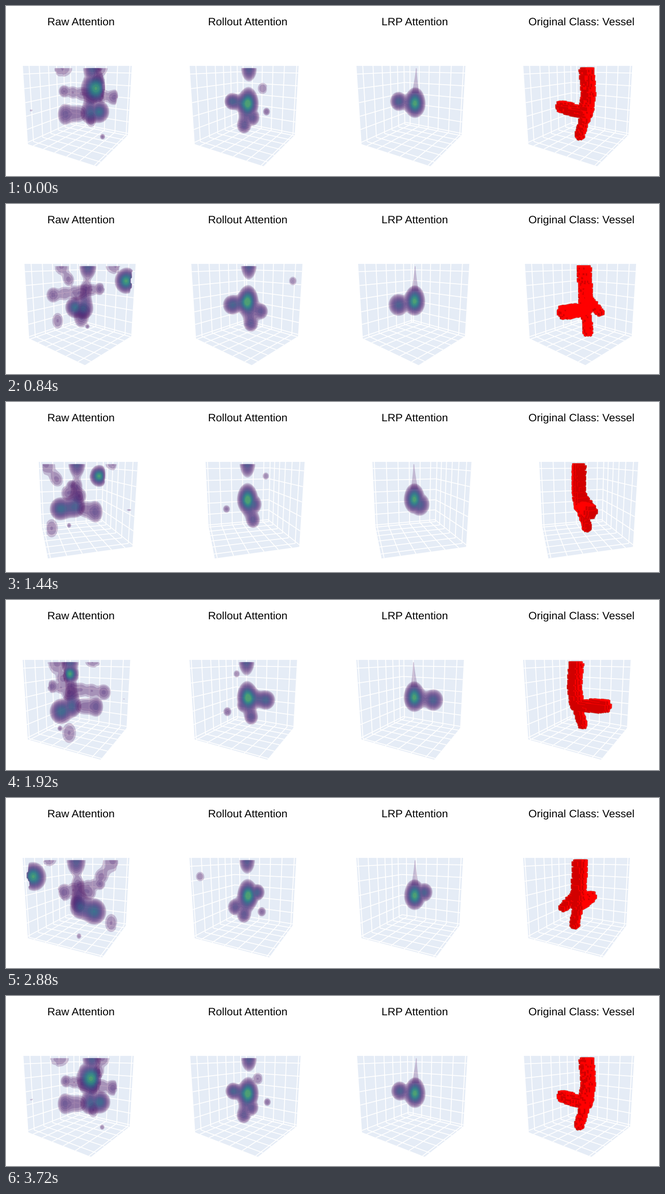
A matplotlib script for the animation above (3.84 s loop, 1280 by 335 pixels).

```python
import numpy as np
import matplotlib.pyplot as plt
from matplotlib.animation import FuncAnimation
from matplotlib.collections import LineCollection, PolyCollection

plt.rcParams["text.hinting"] = "no_hinting"

W, H, DPI = 1280, 335, 100
FRAMES, INTERVAL, STEP = 32, 120, 0.2      # STEP: radians of orbit per frame
CENTERS = (147, 474, 801, 1128)
TITLES = ("Raw Attention", "Rollout Attention", "LRP Attention",
          "Original Class: Vessel")

# Orbiting perspective camera, looking at the middle of a unit cube
PSI0, RADIUS, EYE_Z = np.arctan2(2, -1.25), np.hypot(1.25, 2), 0.5
TILT = np.arctan2(EYE_Z, RADIUS)
SIN_T, COS_T = np.sin(TILT), np.cos(TILT)
FOCAL, HORIZON = 356, 118
CY = HORIZON + FOCAL * np.tan(TILT)
INSET = 13.5 / 28.5
TICKS = (np.arange(0, 26, 5) - 13.5) / 28.5

# Low values get more surfaces, so blobs darken soon inside their rim
LEVELS = .08 + .82 * np.linspace(0, 1, 13) ** 1.35
LAYER_ALPHA = .22


def blob(point, peak, radius=None, stretch=1.15):
    """A Gaussian whose outermost surface has the given radius."""
    radius = radius or .06 + .085 * peak
    sigma = radius / np.sqrt(2 * np.log(peak / LEVELS[0]))
    return np.array(point), peak, sigma, sigma * stretch


def strand(start, end, peak, count=2):
    """Blobs spread evenly between two points."""
    a, b = np.array(start), np.array(end)
    return [blob(a + (b - a) * i / (count + 1), peak)
            for i in range(1, count + 1)]


# Key points: toward the viewer, right, up, as seen in the first pose
CORE, CROWN = (0, .005, 0), (.01, .015, INSET)
BRANCH, FORK, FOOT = (-.163, -.228, .007), (.17, .053, -.133), (.05, -.05, -.28)
NODE, CORNER = (-.146, .265, -.14), (.58, .145, .28)
STEM_TOP, STEM = (.07, .14, INSET), (.03, .115, -.12)
LOBE, SHEET, FLOOR = (.04, -.22, -.13), (.45, -.22, INSET), (-.38, .16, -.33)
RIGHT, LEFT, BACK = (.22, .40, .13), (-.30, -.25, .13), (-.34, .28, INSET)

RAW_FAINT = [
    blob(LOBE, .27, .085, 1.6), blob(RIGHT, .24), blob(LEFT, .22),
    blob(SHEET, .17, .13, .7), blob(BACK, .17, .11), blob(FLOOR, .16, .08, 1.5),
    blob((.05, .29, -.44), .2, .035), blob((.14, -.63, -.05), .13, .03, .4),
    *strand(LOBE, STEM, .13), *strand(LEFT, RIGHT, .15, 4),
    *strand(BACK, STEM, .17),
]
RAW_CORE = [
    blob(CORNER, .95, .15), blob(STEM_TOP, .5, .115, 1.6),
    blob(NODE, .56, .135), blob(STEM, .42, .12),
    *strand(STEM, NODE, .14), *strand(STEM, STEM_TOP, .2, 3)[:2],
]
SPINE = [blob(CORE, .92, stretch=1.35), *strand(CORE, CROWN, .2, 3)[:1]]
ROLLOUT = SPINE + [
    blob(BRANCH, .5), blob(FORK, .4), blob(FOOT, .4), blob(NODE, .22, .05),
    blob(CROWN, .5, .1, 1.7), blob(CORNER, .16, .05),
    *strand(CORE, BRANCH, .28), *strand(CORE, FOOT, .18, 1),
]
LRP = SPINE + [blob(BRANCH, .54, .118), *strand(CORE, BRANCH, .18, 1)]

# Each vessel is a path of key points and its thickness
VESSELS = [
    ([(.02, .065, INSET), (.04, .09, .15), (.05, .06, -.1)], .082),
    ([(.05, .06, -.1), (.09, -.02, -.4)], .055),
    ([(.03, .03, -.11), (-.16, -.28, -.07)], .076),
    ([(.06, .06, .06), (.24, .048, -.14)], .05),
]

# Ray samples in view coordinates stay the same for every pose
PX = np.arange(-117, 118, 2.5)
PY = np.arange(122.5, 290, 2.5)
ray_t = np.linspace(1.6, 3.25, 40)[:, None, None]
ray_x = PX[None, None, :] / FOCAL
ray_y = (CY - PY)[None, :, None] / FOCAL
RAY_U = (RADIUS - ray_t * (COS_T + ray_y * SIN_T)).astype(np.float32)
RAY_V = (ray_t * ray_x).astype(np.float32)
RAY_Z = (EYE_Z + ray_t * (ray_y * COS_T - SIN_T)).astype(np.float32)


def to_world(point):
    u, v, z = point
    c, s = np.cos(PSI0), np.sin(PSI0)
    return np.array([u * c - v * s, u * s + v * c, z])


def project(points, psi, cx):
    x, y, z = np.moveaxis(np.asarray(points, float), -1, 0)
    u = x * np.cos(psi) + y * np.sin(psi)
    v = y * np.cos(psi) - x * np.sin(psi)
    depth = (RADIUS - u) * COS_T - (z - EYE_Z) * SIN_T
    up = (RADIUS - u) * SIN_T + (z - EYE_Z) * COS_T
    return np.stack([cx + FOCAL * v / depth, CY - FOCAL * up / depth], -1)


def on_plane(axis, value, a, b):
    point = [a, b]
    point.insert(axis, value)
    return point


def square(axis, value, half):
    return [on_plane(axis, value, a * half, b * half)
            for a, b in ((-1, -1), (1, -1), (1, 1), (-1, 1))]


def build_vessel(n=40):
    """Boundary faces of the voxelised vessels: corners, centres, normals."""
    half = INSET / n
    cells = np.moveaxis(np.indices((n, n, n)), 0, -1) * 2 * half - INSET + half
    ripple = .006 * np.cos(2 * np.pi * 14 * cells[..., 2])
    solid = np.zeros((n, n, n), bool)
    for path, radius in VESSELS:
        knots = [to_world(p) for p in path]
        for a, b in zip(knots, knots[1:]):
            t = np.clip((cells - a) @ (b - a) / ((b - a) @ (b - a)), 0, 1)
            dist = np.linalg.norm(cells - a - t[..., None] * (b - a), axis=-1)
            solid |= dist < radius + ripple
    padded = np.pad(solid, 1)
    quads, normals = [], []
    for axis in range(3):
        for sign in (-1, 1):
            beside = np.roll(padded, -sign, axis)[1:-1, 1:-1, 1:-1]
            centers = cells[solid & ~beside]
            face = np.array(square(axis, sign * half, half))
            quads.append(centers[:, None] + face)
            normals.append(np.tile(np.eye(3)[axis] * sign, (len(centers), 1)))
    quads = np.concatenate(quads)
    return quads, quads.mean(1), np.concatenate(normals)


QUADS, MIDS, NORMALS = build_vessel()
MOTTLE = (np.random.default_rng(4).random(len(QUADS)) - .5) * .16

fig = plt.figure(figsize=(W / DPI, H / DPI), dpi=DPI, facecolor="white")
ax = fig.add_axes([0, 0, 1, 1])


def draw_box(psi):
    walls = [-np.copysign(.5, np.cos(psi)), -np.copysign(.5, np.sin(psi)), -.5]
    planes, lines = [], []
    for axis, value in enumerate(walls):
        planes.append(square(axis, value, .5))
        for tick in TICKS:
            lines.append([on_plane(axis, value, tick, e) for e in (-.5, .5)])
            lines.append([on_plane(axis, value, e, tick) for e in (-.5, .5)])
    for cx in CENTERS:
        ax.add_collection(PolyCollection(project(planes, psi, cx),
                                         facecolors="#E5ECF6", zorder=1))
        ax.add_collection(LineCollection(project(lines, psi, cx), zorder=1,
                                         colors="white", linewidths=1.25))


def draw_blobs(blobs, theta, inside, cx):
    c, s = np.cos(theta), np.sin(theta)
    field = np.zeros(inside.shape, np.float32)
    for (u, v, z), peak, sigma, sigma_z in blobs:
        du = RAY_U - np.float32(u * c - v * s)
        dv = RAY_V - np.float32(v * c + u * s)
        dz = RAY_Z - np.float32(z)
        field += np.float32(peak) * np.exp(
            (du * du + dv * dv) * np.float32(-.5 / sigma ** 2)
            + dz * dz * np.float32(-.5 / sigma_z ** 2))
    # The brightest value on each ray gives every isosurface's silhouette
    peaks = (field * inside).max(0)
    for level in LEVELS[LEVELS < peaks.max()]:
        ax.contourf(PX + cx, PY, peaks, [level, 9], alpha=LAYER_ALPHA,
                    colors=[plt.cm.viridis(level - LEVELS[0])],
                    antialiased=True)


def draw_spike(psi, cx):
    heights = np.linspace(.15, INSET, 8)
    rise = np.linspace(0, 1, 8)
    axis = np.array([project(to_world((0, .008 + .01 * t, z)), psi, cx)
                     for t, z in zip(rise, heights)])
    half = .8 + 6.2 * (1 - rise) ** 1.3
    ax.fill_betweenx(axis[:, 1], axis[:, 0] - half, axis[:, 0] + half,
                     color=plt.cm.viridis(0), alpha=LAYER_ALPHA, lw=0)


def draw_vessel(psi, cx):
    toward = np.array([np.cos(psi), np.sin(psi), 0])
    eye = RADIUS * toward + [0, 0, EYE_Z]
    facing = ((eye - MIDS) * NORMALS).sum(1) > 0
    order = np.argsort(MIDS[facing] @ toward)
    shapes = project(QUADS[facing][order], psi, cx)
    dark = (NORMALS @ toward + MOTTLE > .79)[facing][order]
    colors = np.where(dark[:, None], (.82, 0, 0), (1, 0, 0))
    for color, width in (("#c99a94", 2), (colors, .8)):
        ax.add_collection(PolyCollection(shapes, facecolors=color, zorder=1,
                                         edgecolors=color, linewidths=width,
                                         joinstyle="round"))


def draw(frame):
    theta = STEP * frame
    psi = PSI0 - theta
    ax.cla()
    ax.axis("off")
    draw_box(psi)

    x = RAY_U * np.cos(psi) - RAY_V * np.sin(psi)
    y = RAY_U * np.sin(psi) + RAY_V * np.cos(psi)
    inside = ((np.abs(x) < INSET) & (np.abs(y) < INSET)
              & (np.abs(RAY_Z) < INSET + .004))
    draw_blobs(RAW_FAINT, theta, inside, CENTERS[0])
    draw_blobs(RAW_CORE, theta, inside, CENTERS[0])
    draw_blobs(ROLLOUT, theta, inside, CENTERS[1])
    draw_spike(psi, CENTERS[2])
    draw_blobs(LRP, theta, inside, CENTERS[2])
    draw_vessel(psi, CENTERS[3])

    for cx, title in zip(CENTERS, TITLES):
        ax.text(cx, 37.8, title, ha="center", va="baseline", color="black",
                family="Liberation Sans", fontsize=21.4 * 72 / DPI)
    ax.set(xlim=(0, W), ylim=(H, 0))
    return []


anim = FuncAnimation(fig, draw, frames=FRAMES, interval=INTERVAL,
                     init_func=lambda: [], repeat=True, repeat_delay=0)
plt.show()
```
